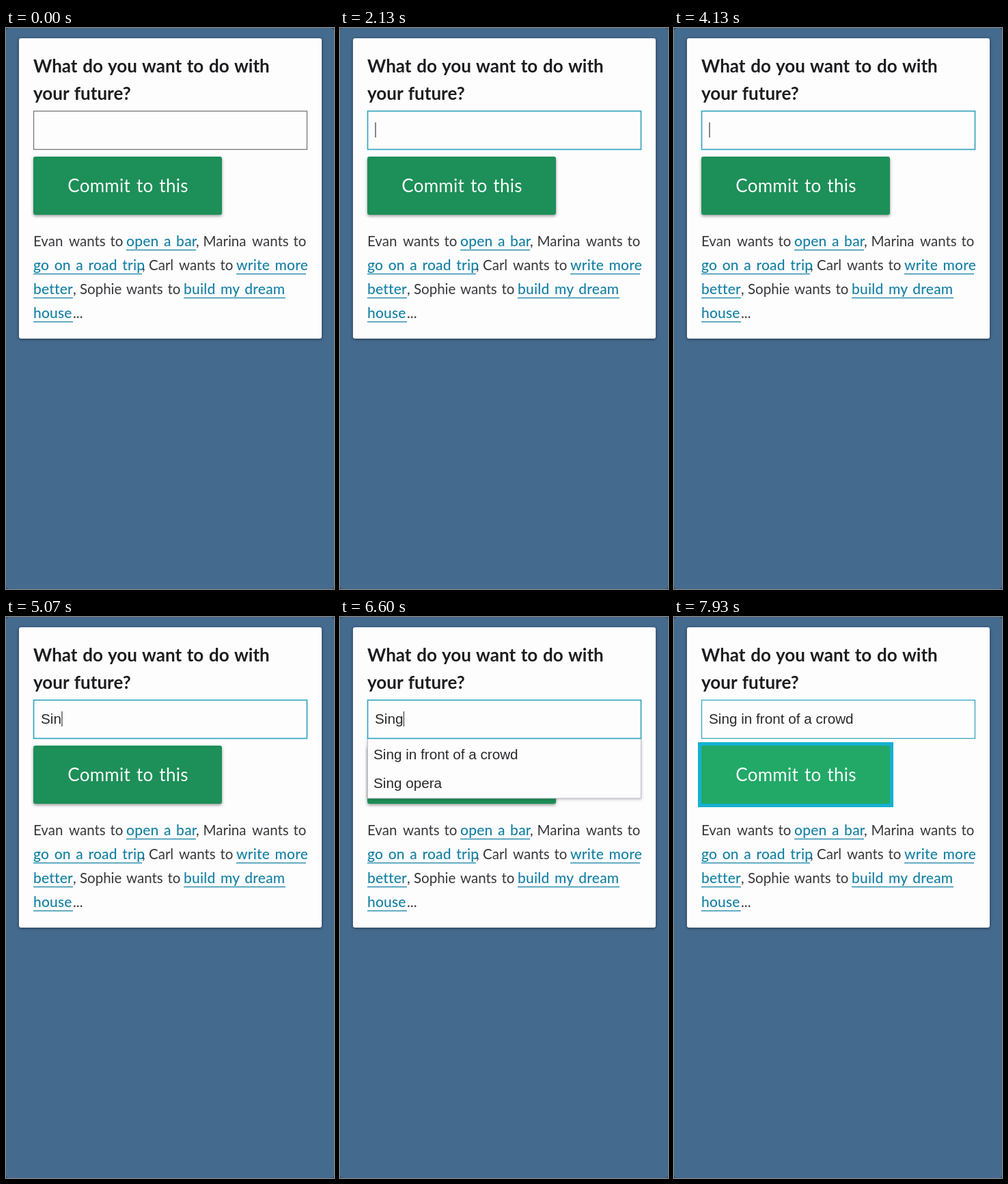
Write an HTML page that moves like this. It is 480 by 820 pixels and loops after 8000 ms.

```html
<!DOCTYPE html>
<html lang="en">
<head>
<meta charset="utf-8">
<title>Future form</title>
<style>
  html, body { margin: 0; width: 100%; height: 100%; overflow: hidden; background: #2f5070; }
  svg { display: block; width: 100%; height: 100%; }
  text { white-space: pre; }
  .title { font: 700 26px Lato, sans-serif; word-spacing: 1.4px; fill: #1d1d20; }
  .label { font: 400 26px Lato, sans-serif; letter-spacing: .25px; word-spacing: 2px; fill: #fbfffc; }
  .body { font: 400 20.5px Lato, sans-serif; word-spacing: 1.5px; fill: #37373b; }
  .link { font: 500 21px Lato, sans-serif; letter-spacing: .2px; word-spacing: 2px; fill: #1580a4; }
  .rule { stroke: #2c8fac; stroke-width: 1.4; }
  .field { font: 400 20.7px "Liberation Sans", Arial, sans-serif; fill: #29292c; }
  .card { fill: #fdfdfe; filter: drop-shadow(0 1px 2px rgba(0, 0, 0, .45)); }
  .raised { filter: drop-shadow(0 2px 2px rgba(0, 0, 0, .4)); }
  .menu { fill: #fdfdfe; stroke: #bcbfc9; filter: drop-shadow(0 1px 2px rgba(0, 0, 0, .25)); }
</style>
</head>
<body>
<svg viewBox="0 0 480 820">
  <rect width="480" height="820" rx="5" fill="#446a8e"/>
  <rect class="card" x="19" y="15" width="443" height="439" rx="3"/>
  <text class="title" x="40" y="65">What do you want to do with</text>
  <text class="title" x="40" y="105">your future?</text>

  <rect id="ring" x="37.5" y="185.5" width="281" height="90" fill="#1da6c6" stroke="#16b0d0" stroke-width="5"/>
  <rect id="button" x="40" y="188" width="276" height="85" rx="3"/>
  <text class="label" x="178.5" y="240" text-anchor="middle">Commit to this</text>

  <g id="copy"></g>

  <g id="menu">
    <rect class="menu" x="40.5" y="177.5" width="400" height="87.5"/>
    <rect id="pick" x="40" y="177" width="401" height="46" fill="#0a7eff"/>
    <text id="first" class="field" x="49" y="207.5">Sing in front of a crowd</text>
    <text class="field" x="49" y="250">Sing opera</text>
  </g>

  <rect id="box" x="40.5" y="121.5" width="400" height="56" fill="#fdfdfe"/>
  <text id="value" class="field" x="51" y="156"></text>
  <rect id="caret" y="138" width="1.4" height="22" fill="#55555a"/>
</svg>
<script>
const $ = id => document.getElementById(id);
const NS = 'http://www.w3.org/2000/svg';
const LOOP = 8000, BLINK = 1000;

function add(tag, attrs, content = '') {
  const el = document.createElementNS(NS, tag);
  for (const key in attrs) el.setAttribute(key, attrs[key]);
  el.textContent = content;
  $('copy').append(el);
}

const lineY = row => 318.5 + row * 35;
const word = (row, x, content) => add('text', { class: 'body', x, y: lineY(row) }, content);

function link(row, x, end, content) {
  const y = lineY(row);
  add('text', { class: 'link', x, y }, content);
  add('line', { class: 'rule', x1: x, x2: end, y1: y + 6, y2: y + 6 });
}

word(0, 40, 'Evan');
word(0, 92, 'wants to');
link(0, 176, 278, 'open a bar');
word(0, 278, ',');
word(0, 288.5, 'Marina');
word(0, 360, 'wants to');
link(1, 40, 199, 'go on a road trip');
word(1, 199, ',');
word(1, 209, 'Carl');
word(1, 253, 'wants to');
link(1, 337, 439, 'write more');
link(2, 40, 98, 'better');
word(2, 98, ',');
word(2, 108, 'Sophie');
word(2, 176, 'wants to');
link(2, 260, 409, 'build my dream');
link(3, 40, 98, 'house');
word(3, 98, '...');

// Each step starts at a time and changes part of the form's state.
const steps = [
  { at: 0, text: '', focus: '', menu: false, picked: false },
  { at: 2100, focus: 'box' },
  { at: 4550, text: 'S' },
  { at: 4750, text: 'Si' },
  { at: 4950, text: 'Sin' },
  { at: 5250, text: 'Sing', menu: true },
  { at: 6650, text: 'Sing in front of a crowd', picked: true },
  { at: 7400, menu: false },
  { at: 7700, focus: 'button' }
];

const show = (id, on) => $(id).setAttribute('visibility', on ? 'visible' : 'hidden');

function draw(t) {
  const state = Object.assign({}, ...steps.filter(step => step.at <= t));
  const onButton = state.focus === 'button', onBox = state.focus === 'box';

  $('value').textContent = state.text;
  $('box').setAttribute('stroke', state.focus ? '#35a6bd' : '#77777b');
  $('box').setAttribute('stroke-width', onBox ? 1.7 : 1.3);

  const end = state.text ? $('value').getComputedTextLength() : 0;
  $('caret').setAttribute('x', 51.3 + end);
  show('caret', onBox && (t - state.at) % BLINK < BLINK / 2);

  show('menu', state.menu);
  show('pick', state.menu && state.picked);
  $('first').style.fill = state.picked ? '#f4faff' : '';

  show('ring', onButton);
  $('button').setAttribute('fill', onButton ? '#22a967' : '#1d8f58');
  $('button').setAttribute('class', onButton ? '' : 'raised');
}

const start = performance.now();
function tick() {
  draw((performance.now() - start) % LOOP);
  requestAnimationFrame(tick);
}
tick();
</script>
</body>
</html>
```
